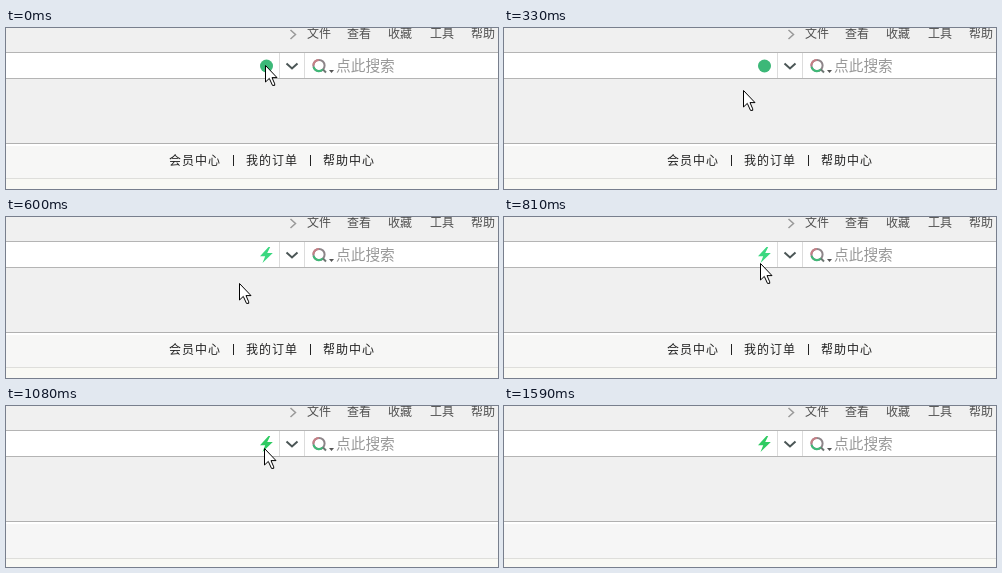
An HTML page that plays this animation: 492x161 px, repeating every 1.98 s.

```html
<!DOCTYPE html>
<html lang="zh">
<head>
<meta charset="utf-8">
<style>
html, body { margin: 0; width: 492px; height: 161px; overflow: hidden; background: #f0f0f0; }
svg { display: block; }
text { font-family: "Noto Sans CJK SC", "Noto Sans CJK", sans-serif; font-size: 12px; }
.menu { fill: #505050; }
.links { fill: #222; letter-spacing: 1px; }
.line { fill: none; stroke-linejoin: miter; }
</style>
</head>
<body>
<svg width="492" height="161" viewBox="0 0 492 161">
  <rect width="492" height="161" fill="#f0f0f0"/>

  <path class="line" d="M284.5 2l5 4.5-5 4.5" stroke="#999" stroke-width="1.5"/>
  <g class="menu">
    <text x="301" y="10">文件</text>
    <text x="341" y="10">查看</text>
    <text x="382" y="10">收藏</text>
    <text x="424" y="10">工具</text>
    <text x="465" y="10">帮助</text>
  </g>

  <rect y="24" width="492" height="27" fill="#b4b4b4"/>
  <rect y="25" width="492" height="25" fill="#fff"/>
  <rect x="273" y="25" width="1" height="25" fill="#dcdcdc"/>
  <rect x="298" y="25" width="1" height="25" fill="#dcdcdc"/>
  <circle id="mode" cx="260.5" cy="38" r="6.5" fill="#3cb878"/>
  <path id="bolt" d="M262.5 30L254 39.2h5.2L256.5 46l10.3-10h-5.6l3-6z"/>
  <path class="line" d="M280.5 35.5l5.5 5 5.5-5" stroke="#4b5656" stroke-width="2"/>

  <g class="line" stroke-width="2">
    <circle cx="313" cy="37.5" r="5.6" stroke="#8d8589"/>
    <path d="M307.4 37.5a5.6 5.6 0 0 1 5.6-5.6" stroke="#c77f86"/>
    <path d="M307.6 39a5.6 5.6 0 0 0 9.4 2.4" stroke="#3fba78"/>
    <path d="M317 41.5l3 3" stroke="#6d7773"/>
  </g>
  <path d="M323 42h5l-2.5 3z" fill="#555"/>
  <text x="330" y="43" style="font-size:14.7px" fill="#999">点此搜索</text>

  <rect y="115" width="492" height="1" fill="#b0b0b0"/>
  <rect y="116" width="492" height="2" fill="#fff"/>
  <rect id="band" y="118" width="492" height="43"/>
  <rect id="foot" width="492" height="43" fill="#f9f9f4"/>
  <rect id="rule" width="492" height="1" fill="#dededb"/>
  <g id="links" class="links">
    <text x="163" y="137">会员中心</text>
    <text x="240" y="137">我的订单</text>
    <text x="317" y="137">帮助中心</text>
    <path d="M227 127h1v11h-1zM304 127h1v11h-1z"/>
  </g>

  <path id="cursor" d="M.5 .5V17l3.8-3.6 3.2 7h2.2v-1.6l-2.7-6.2h5z"
        fill="#fff" stroke="#000"/>
</svg>
<script>
const LOOP = 1980, STEP = 30;
const $ = id => document.getElementById(id);
const show = (id, on) => $(id).setAttribute('visibility', on ? 'visible' : 'hidden');

// Pointer path: time, x, y and the easing used to arrive there
const linear = u => u;
const easeOut = u => 1 - (1 - u) ** 1.5;
const easeIn = u => u ** 2.4;
const path = [
  [0, 259, 37, linear],
  [120, 259, 37, linear],
  [240, 246, 56, linear],
  [450, 233, 66, easeOut],
  [720, 233, 66, linear],
  [810, 256, 46, linear],
  [1020, 258, 42, easeOut],
  [1350, 258, 42, linear],
  [1560, 467, 154, easeIn],
  [LOOP, 467, 154, linear]
];

function pointerAt(t) {
  const i = path.findIndex(p => p[0] > t);
  const [t0, x0, y0] = path[i - 1];
  const [t1, x1, y1, ease] = path[i];
  const u = ease((t - t0) / (t1 - t0));
  return [x0 + (x1 - x0) * u, y0 + (y1 - y0) * u].map(Math.round);
}

function draw(ms) {
  const t = Math.floor((ms % LOOP) / STEP) * STEP;
  const fast = t >= 600, blank = t >= 1080;

  show('mode', !fast);
  show('bolt', fast);
  $('bolt').setAttribute('fill', t < 840 ? '#3bd880' : '#2fcb62');

  show('links', !blank);
  $('band').setAttribute('fill', blank ? '#f6f6f6' : '#f7f7f6');
  $('rule').setAttribute('y', blank ? 152 : 150);
  $('foot').setAttribute('y', blank ? 153 : 151);

  show('cursor', t < 1590);
  $('cursor').setAttribute('transform', `translate(${pointerAt(t)})`);
}

const start = performance.now();
function tick() {
  draw(performance.now() - start);
  requestAnimationFrame(tick);
}
tick();
</script>
</body>
</html>
```
